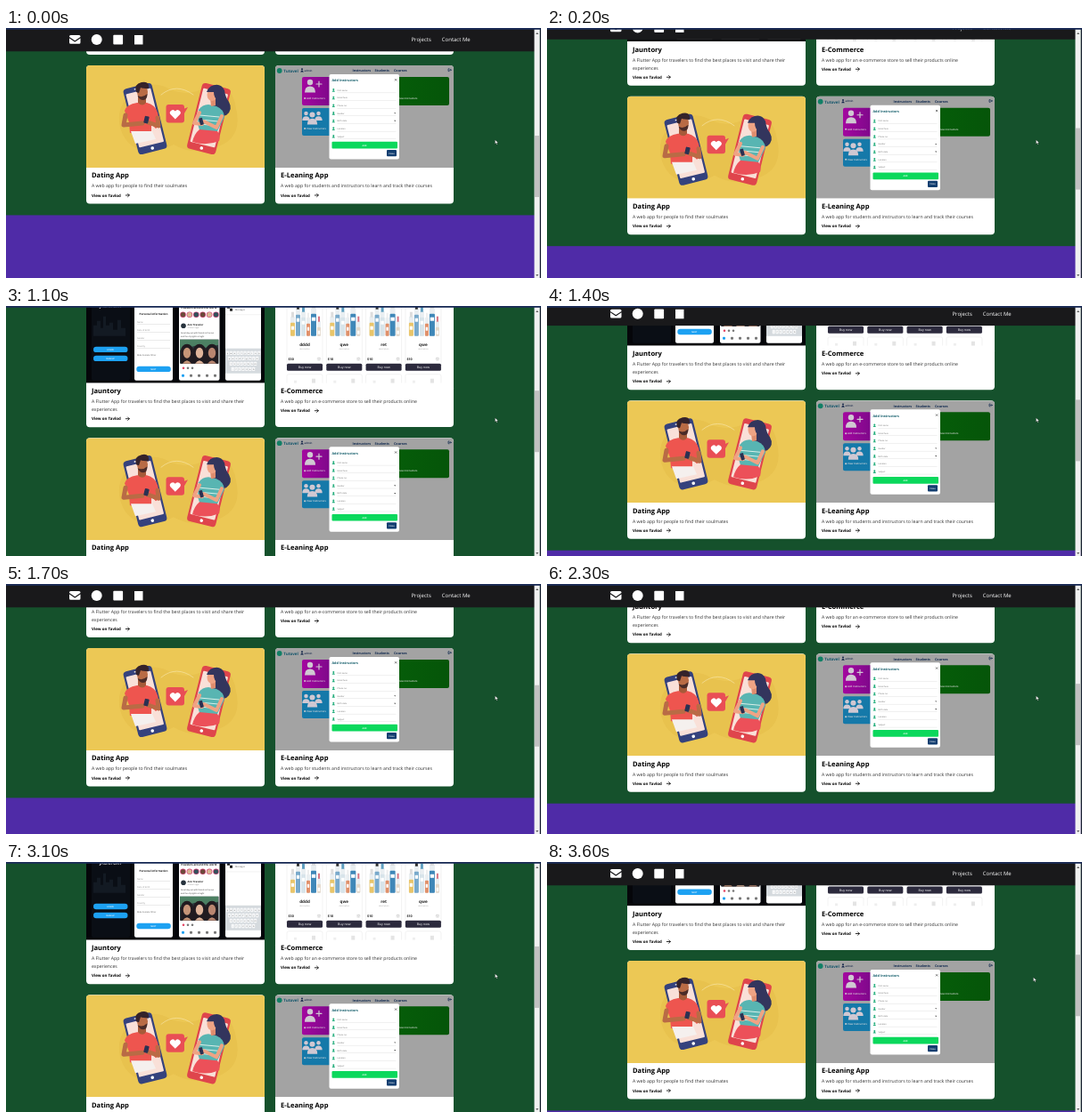
Animation of 600 by 281 pixels, one loop 3700 ms. Source, as an HTML page:

```html
<!DOCTYPE html>
<html lang="en">
<head>
<meta charset="utf-8">
<title>Portfolio scroll</title>
<style>
html, body { margin: 0; width: 100%; height: 100%; overflow: hidden; background: #15512c; }
svg { display: block; width: 600px; height: 281px; }
text { font-family: "Open Sans", "Noto Sans", sans-serif; text-rendering: geometricPrecision; }
</style>
</head>
<body>
<svg id="stage" viewBox="0 0 600 281"></svg>
<script>
const rect = (x, y, w, h, fill, r = 0, more = '') =>
  `<rect x="${x}" y="${y}" width="${w}" height="${h}" rx="${r}" fill="${fill}" ${more}/>`;
const circle = (x, y, r, fill) => `<circle cx="${x}" cy="${y}" r="${r}" fill="${fill}"/>`;
const path = (d, fill, more = '') => `<path d="${d}" fill="${fill}" ${more}/>`;
const line = (d, color, w) =>
  path(d, 'none', `stroke="${color}" stroke-width="${w}" stroke-linecap="round" stroke-linejoin="round"`);
const text = (x, y, s, size, fill = '#111', weight = 400, anchor = 'start') =>
  `<text x="${x}" y="${y}" font-size="${size}" fill="${fill}" font-weight="${weight}" text-anchor="${anchor}">${s}</text>`;
const group = (x, y, body, more = '') => `<g transform="translate(${x} ${y}) ${more}">${body}</g>`;
const each = (list, fn) => list.map(fn).join('');
const range = n => [...Array(n).keys()];

function card(x, y, art, title, lines) {
  const end = 138 + 9 * (lines.length - 1);
  return group(x, y,
    rect(0, 0, 200, end + 17.5, '#fff', 4) +
    `<g clip-path="url(#shot)">${art}</g>` +
    text(6, 126.3, title, 7.6, '#000', 700) +
    each(lines, (s, i) => text(6, 137.4 + 9 * i, s, 5.16, '#333')) +
    text(6, end + 9.6, 'View on Tavlod', 4.45, '#000', 700) +
    line(`M44.3 ${end + 8}h4m-1.7 -1.7l1.7 1.7l-1.7 1.7`, '#000', .8));
}

// Travel app: four phone screens on black
function travelArt() {
  const pill = (x, y, s) => rect(x, y, 38.5, 6.4, '#1da1f2', 3.2) + text(x + 19, y + 4.3, s, 2.4, '#fff', 600, 'middle');
  const splash = rect(6, 6, 43, 106, '#0a0e15', 2) +
    path('M8 62V50h4v-5h4v8h3V40h3v10h4V47h4v8h5V44h4v9h5v9z', '#131a23') +
    text(27.5, 30.5, 'JAUNTORY', 5, '#fff', 600, 'middle') +
    pill(8, 74, 'LOGIN') + pill(8, 84, 'SIGN UP');
  const form = rect(54, 6, 43, 106, '#fff', 2) +
    text(75.5, 38, 'Personal information', 3, '#222', 700, 'middle') +
    each(['Name', 'Date of birth', 'Gender', 'Country'], (s, i) =>
      text(57, 47 + i * 9, s, 2.4, '#888') + rect(57, 48.5 + i * 9, 37, .4, '#ccc')) +
    text(57, 84, 'Male   Female   Other', 2.4, '#555') + pill(56.3, 96, 'NEXT');
  const tones = ['#c69578', '#e0b59b', '#b98670'];
  const feed = rect(104, 6, 45.5, 106, '#fff', 2) +
    text(106, 31.5, 'Travelers around the world', 3, '#222', 700) +
    each(range(6), i => circle(108.5 + i * 7.4, 38, 3.3, '#d6457a') +
      circle(108.5 + i * 7.4, 38, 2.6, ['#6b4a3a', '#d8b894', '#34515c'][i % 3])) +
    circle(109, 50.5, 2.8, '#26323c') + text(113.5, 50, 'Ann Traveler', 2.8, '#222', 700) +
    text(113.5, 53.5, '2 hours ago', 2.3, '#888') +
    text(106, 59.5, 'Great day out with friends in the sun', 2.2, '#222') +
    text(106, 63, 'and the city lights at night', 2.2, '#222') +
    rect(105, 66, 43.5, 27, '#2b383c') + path('M105 66h43v6l-14 3l-12 -2l-17 5z', '#4c8063') +
    each(tones, (c, i) => path(`M${106 + i * 14} 93v-14a7 8 0 0 1 14 0v14z`, '#211b20') +
      `<ellipse cx="${113 + i * 14}" cy="81" rx="4.2" ry="6" fill="${c}"/>` +
      path(`M${108 + i * 14} 93q5 -7 10 0z`, c)) +
    circle(109, 98, 1.3, '#e24562') + circle(114, 98, 1.3, '#777') + circle(119, 98, 1.3, '#777') +
    each(range(5), i => rect(107 + i * 9, 105, 3, 3, i ? '#777' : '#1da1f2', 1));
  const chat = rect(156, 6, 40, 106, '#fff', 2) +
    rect(158, 28, 3, 3, '#222') + rect(161, 31, 3, 3, '#222') + text(167, 33, 'Messages', 2.4, '#555') +
    rect(156, 38, 40, .4, '#ddd') + rect(156, 76, 40, 28, '#d5dade') +
    each(range(4), r => each(range(10 - r), k =>
      rect(157 + r * 1.9 + k * 3.9, 79 + r * 6, 3.1, 4.4, '#f7f8f9', .6) +
      text(158.5 + r * 1.9 + k * 3.9, 82.2 + r * 6, 'qwertyuiopasdfghjklzxcvbnm,.?123abc'[r * 9 + k] || '', 2.3, '#555', 400, 'middle')));
  return rect(0, 0, 200, 115, '#05060a') + splash + form + feed + chat;
}

// Shop: product cards in a row, with the tops of the next row below
function shopArt() {
  const tube = (x, top, w, color, cap) => rect(x, top, w, 62 - top, '#e9eef1', 1) +
    rect(x, top + 7, w, 55 - top, color, 1) + rect(x + 1, top - 5, w - 2, 6, cap) +
    rect(x + .8, top + 11, w - 1.6, 4, '#fff');
  const bottles = tube(4, 40, 5, '#e9c56a', '#ddd') + tube(10, 31, 5, '#78a9cb', '#333') +
    tube(16, 34, 5, '#d8e4ea', '#5f9fc0') + tube(22, 41, 4, '#e0906a', '#eee') +
    tube(27, 30, 6, '#3f87b8', '#d8d8d8') + tube(34, 45, 4, '#e3d9cc', '#d87583');
  return rect(0, 0, 200, 115, '#fff') + each(['dddd', 'qwe', 'ret', 'qwe'], (name, i) =>
    group(13 + i * 44.3, 0,
      rect(0, 10, 40, 91, '#fff', 2, 'stroke="#e4e4e4" stroke-width=".5"') + bottles +
      text(20, 73, name, 4.6, '#222', 700, 'middle') + text(20, 77.2, 'description', 2.2, '#999', 400, 'middle') +
      text(1.5, 89.6, i ? '$10' : '$30', 3.7, '#222', 700) +
      circle(36, 88, 2.4, '#eee') + text(36, 89.4, '♡', 4, '#777', 400, 'middle') +
      rect(0, 93, 40, 8, '#2c2a3d', 1.5) + text(20, 98.3, 'Buy now', 3.6, '#fff', 400, 'middle') +
      rect(0, 105, 40, 16, '#fff', 2, 'stroke="#e4e4e4" stroke-width=".5"') +
      rect(8, 112, 3, 4, '#eee') + rect(28, 110, 4, 6, '#e4e4e4')));
}

function datingArt() {
  const phone = (x, turn, frame) => group(x, 60,
    rect(-16.5, -38, 33, 76, frame, 4) + rect(-14.3, -32, 28.6, 62, '#f9e0d8', 1) +
    rect(-4, -35.7, 8, 1.4, '#fff', .7) + circle(0, 34, 1.8, '#fff'), `rotate(${turn})`);
  const man =
    path('M46 47q2 -7 14 -9h11q9 2 12 11l3 14l-5 4l-5 -5v10H52l-1 -12z', '#ee554f') +
    path('M61 30h9v8q-4 5 -9 0z', '#a65a39') +
    `<ellipse cx="66" cy="26" rx="6" ry="7.5" fill="#b96b45"/>` +
    path('M59 26q-3 -9 6 -11q9 -2 8 7q-7 0 -9 -1l-2 6z', '#35232b') +
    path('M60.500 30q5.500 3 11 -2q0 7 -4.500 7t-6.500 -5z', '#4a2b28') +
    line('M47 52l-2 11l21 -2M83 55l1 9l-12 -4', '#b96b45', 5) +
    rect(68, 53, 5, 8, '#2b3152', 1, 'transform="rotate(14 70 57)"') +
    path('M53 70h24l4 9l-23 5z', '#f5f0ee');
  const woman =
    path('M136 18q11 -6 16 4q1 8 5 13q5 9 -3 15q-11 3 -15 -6z', '#33355d') +
    path('M123 44q4 -6 11 -6l9 2q8 3 9 12l-9 18h-18l-3 -10z', '#58b5b2') +
    line('M124 50l22 2M124 55l21 2M125 60l19 2', '#d9efe9', 1) +
    path('M136 31h6v8l-5 1z', '#df8d6e') +
    `<ellipse cx="138" cy="27" rx="5.5" ry="7" fill="#efa384"/>` +
    path('M132 24q3 -9 11 -6q5 5 2 15q-5 -2 -5 -9z', '#33355d') +
    line('M149 51l-6 13l-14 -7M124 47l-6 12l9 1', '#efa384', 4) +
    rect(124, 53, 4, 8, '#2b3152', 1, 'transform="rotate(-16 126 57)"') +
    path('M124 66l20 2q4 5 2 11q-14 6 -30 1q2 -9 8 -14z', '#ec5059');
  return rect(0, 0, 200, 115, '#ecc855') +
    path('M38 70q-6 -28 18 -40q18 -16 40 -2q22 8 42 -6q26 -2 30 26q8 34 -22 44q-26 10 -48 -3q-26 14 -46 2q-10 -7 -14 -21z', '#e8c24e') +
    line('M84 33q17 -14 36 0', '#f8e7b1', .6) +
    phone(66, -14, '#35427d') + phone(137.5, 14, '#df454c') + group(-3, 4, man) + group(3, 6, woman) +
    rect(89.5, 44, 20.5, 20.5, '#e94e55', 3) + path('M109 49l5 -2l-4 7z', '#e94e55') +
    path('M99.8 60.5l-5.4 -5.4a3.2 3.2 0 0 1 5.4 -3.5a3.2 3.2 0 0 1 5.4 3.5z', '#fff');
}

function learnArt() {
  const person = (x, y, k = 1) => group(x, y,
    circle(0, 0, 3.2, '#d0c8d2') + path('M-6 11.500q0 -7 6 -7t6 7z', '#d0c8d2'), `scale(${k})`);
  const fields = ['First name', 'Email here', 'Phone no.', 'Gender', 'Birth date', 'Location', 'Subject'];
  return rect(0, 0, 200, 115, '#a3a3a3') +
    circle(4.7, 6, 2.9, '#128066') + text(9.3, 8, 'Tutovel', 4.5, '#12556b', 700) +
    circle(30, 4.3, 1, '#15264a') + path('M28.2 7.4q1.8 -3.8 3.6 0z', '#15264a') + text(32.5, 6.6, 'admin', 2.9, '#15264a', 600) +
    each([[86.5, 'Instructors'], [111.5, 'Students'], [133, 'Courses']], ([x, s]) => text(x, 7.4, s, 3.7, '#112a50', 700)) +
    line('M195 3.8h-1v2.800h1M195 5.200h2.300m-.8 -.8l.8 .8l-.8 .8', '#112a50', .7) +
    rect(30, 13, 60, 32, 'url(#plum)', 2) + rect(30, 48, 60, 31, '#1579a9', 2) + rect(110, 13, 85, 32, 'url(#leaf)', 2) +
    person(39, 19) + line('M49 18v6m-3 -3h6', '#d0c8d2', 1.2) +
    person(34.500, 54, .7) + person(48.500, 54, .7) + person(41.500, 55.500, .95) +
    each([[32.5, 38, 'Add Instructors'], [32.5, 72, 'View Instructors'], [135, 38, 'View Instructors']],
      ([x, y, s]) => circle(x + .7, y - 1, 1, '#d0d0d0') + text(x + 2.5, y, s, 2.8, '#ddd', 600)) +
    rect(60.5, 10, 78.5, 95.500, '#fff', 2) +
    text(63.5, 18.4, 'Add Instructors', 3.8, '#17606d', 700) + line('M134.300 15.5l1.600 1.600m0 -1.600l-1.600 1.600', '#333', .6) +
    each(fields, (s, i) => {
      const y = 27.7 + i * 8.65;
      return circle(65.3, y - .6, 1, '#1dab78') + path(`M63.6 ${y + 2}q1.7 -3.6 3.4 0z`, '#1dab78') +
        text(69.5, y + 1, s, 2.3, '#666') + rect(69.5, y + 3, 66, .35, '#d4d4d4') +
        (i == 3 || i == 4 ? path(`M133.2 ${y - .5}h2l-1 1.4z`, '#444') : '');
    }) +
    rect(63.5, 85.700, 73.5, 7.7, '#0bd85c', 1) + text(100, 90.5, 'Add', 2.6, '#fff', 600, 'middle') +
    rect(125, 95, 11, 7.3, '#123e70', 1) + text(130.5, 99.5, 'Close', 2.5, '#fff', 600, 'middle');
}

const gradient = (id, a, b) =>
  `<linearGradient id="${id}"><stop stop-color="${a}"/><stop offset="1" stop-color="${b}"/></linearGradient>`;

document.getElementById('stage').innerHTML =
  `<defs>${gradient('plum', '#a3079f', '#5d0a78')}${gradient('leaf', '#066009', '#055509')}
    <clipPath id="shot"><path d="M0 115V4a4 4 0 0 1 4 -4h192a4 4 0 0 1 4 4v111z"/></clipPath></defs>` +
  rect(0, 0, 600, 281, '#15512c') +
  `<g id="page">` + rect(0, 168.4, 600, 300, '#4f2ba7') +
  card(90, -176.5, travelArt(), 'Jauntory', ['A Flutter App for travelers to find the best places to visit and share their', 'experiences']) +
  // a one-line description sits in a card stretched to its neighbour's height
  rect(302, -60, 200, 47.9, '#fff', 4) +
  card(302, -176.5, shopArt(), 'E-Commerce', ['A web app for an e-commerce store to sell their products online']) +
  card(90, 0, datingArt(), 'Dating App', ['A web app for people to find their soulmates']) +
  card(302, 0, learnArt(), 'E-Leaning App', ['A web app for students and instructors to learn and track their courses']) +
  `</g><g id="bar">` + rect(0, 0, 593, 26.3, '#19191b') +
  path('M71 9.5q0 -1.5 1.5 -1.5h9.5q1.5 0 1.5 1.5v.6l-6.25 4.2l-6.25 -4.2zM71 11.5l6.25 4.2l6.25 -4.2v4.8q0 1.5 -1.5 1.5h-9.5q-1.5 0 -1.5 -1.5z', '#fff') +
  circle(101.7, 13, 6, '#fff') + rect(120.3, 7.7, 10.8, 10.8, '#fff', 1) + rect(144, 8, 9.5, 10.5, '#fff') +
  text(454.5, 15.2, 'Projects', 6, '#fff') + text(488.8, 15.2, 'Contact Me', 6, '#fff') +
  `</g>` +
  rect(592.5, 0, 6.3, 281, '#f1f1f1') + rect(598.8, 0, 1.2, 281, '#1c2333') +
  path('M594.2 7l1.5 -2l1.5 2z', '#555') + path('M594.2 277l1.5 2l1.5 -2z', '#555') +
  `<g id="thumb">${rect(593, 0, 5.3, 69, '#c1c1c1')}</g>` +
  rect(0, 0, 600, 1.8, '#1b2c57') +
  `<g id="mouse">${path('M0 0v4.6l1.1 -1l.8 1.7l.8 -.4l-.8 -1.6h1.5z', '#fff', 'stroke="#222" stroke-width=".3"')}</g>`;

// Each move: start ms, end ms, from, to
const scroll = [[0, 400, 42, 111.5], [570, 800, 111.5, 149.5], [1050, 1700, 149.5, 72], [2215, 2700, 72, 149.5], [3080, 3550, 149.5, 111]];
const slide = [[0, 400, 0, -27], [1100, 1500, -27, 0], [2300, 2600, 0, -27], [3100, 3500, -27, 0]];
const drift = [[0, 1, 0, 0], [3400, 3600, 0, 1]];

function at(moves, t) {
  const [start, end, from, to] = moves.findLast(m => t >= m[0]);
  const k = Math.min(1, (t - start) / (end - start));
  return from + (to - from) * k * k * (3 - 2 * k);
}
const place = (id, x, y) => document.getElementById(id).setAttribute('transform', `translate(${x} ${y})`);

function draw() {
  const t = Math.floor(performance.now() % 3700 / 100) * 100; // ten pictures a second
  const y = at(scroll, t), d = at(drift, t);
  place('page', 0, y);
  place('bar', 0, at(slide, t));
  place('thumb', 0, 121 - (y - 42) * .243);
  place('mouse', 548.5 - 3 * d, 125.7 + 4 * d);
  requestAnimationFrame(draw);
}
draw();
</script>
</body>
</html>
```
